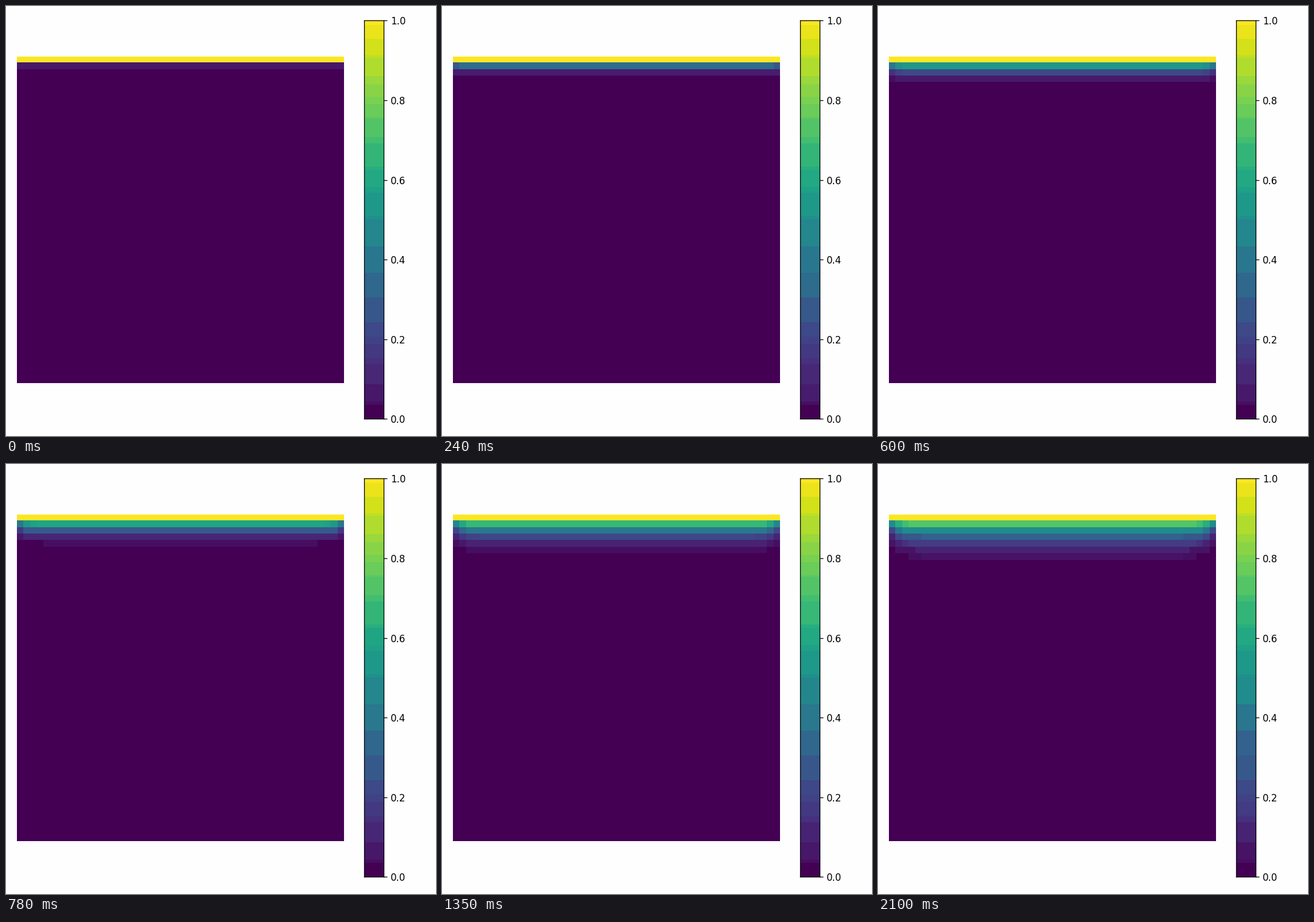
Animation, 748 px wide and 748 px high, one loop 2160 ms. Source, as a matplotlib script:

```python
import numpy as np
import matplotlib.pyplot as plt
from matplotlib.animation import FuncAnimation

SIZE, DPI = 748, 120
FRAMES, INTERVAL = 72, 30
CELLS = 50
RATE = 0.0625                 # diffusion number per time step
FRONT_STEP = 0.5272           # advance of the heat front between redraws

# Plate and colour scale, in pixels from the top left.
MIDDLE = 371.9
PLATE_LEFT, PLATE_SIDE = 19.0, 568.2
SCALE_LEFT, SCALE_HEIGHT = 622.7, 693.0
CELL_AREA = (PLATE_SIDE / CELLS) ** 2
LEVEL_AREA = SCALE_HEIGHT ** 2 / 20 / 256

LEVELS = np.linspace(1, 0, 256)[:, None]
viridis = plt.get_cmap("viridis")


def simulate(steps):
    """Heat spreading from a hot top row; everything outside is cold."""
    heat = np.zeros((CELLS, CELLS))
    heat[0] = 1
    for _ in range(steps):
        p = np.pad(heat, 1)
        near = p[:-2, 1:-1] + p[2:, 1:-1] + p[1:-1, :-2] + p[1:-1, 2:]
        heat = heat + RATE * (near - 4 * heat)
        heat[0] = 1
        yield heat


def reduce_colors(heat):
    """Merge viridis colours that share their leading 3, 4 and 3 bits."""
    values = np.concatenate([heat.ravel(), LEVELS.ravel()])
    area = np.repeat([CELL_AREA, LEVEL_AREA], [heat.size, LEVELS.size])
    rgb = viridis(values, bytes=True)[:, :3].astype(int)
    red, green, blue = rgb.T
    key = (red >> 5 << 7) | (green >> 4 << 3) | (blue >> 5)
    _, group = np.unique(key, return_inverse=True)
    total = np.bincount(group, area)
    palette = np.stack([np.bincount(group, area * channel) / total
                        for channel in rgb.T], axis=1)
    colors = (palette[group] + 1e-6).astype(np.uint8)
    return (colors[:heat.size].reshape(CELLS, CELLS, 3),
            colors[heat.size:].reshape(-1, 1, 3))


def add_image(colors, left, width, height):
    ax = fig.add_axes([left / SIZE, 1 - (MIDDLE + height / 2) / SIZE,
                       width / SIZE, height / SIZE])
    image = ax.imshow(colors, interpolation="nearest", aspect="auto",
                      extent=(0, 1, 0, 1))
    return ax, image


# The front moves with the square root of time, so redraws grow rarer.
fronts = 1 + FRONT_STEP * np.arange(FRAMES)
redraws = np.floor(fronts ** 2).astype(int) - 1
redraws = redraws[redraws < FRAMES]
states = list(simulate(FRAMES))
pictures = [reduce_colors(states[step]) for step in redraws]

plt.rcParams["font.family"] = "DejaVu Sans"
fig = plt.figure(figsize=(SIZE / DPI, SIZE / DPI), dpi=DPI, facecolor="#fefefe")

plate_ax, plate = add_image(pictures[0][0], PLATE_LEFT, PLATE_SIDE, PLATE_SIDE)
plate_ax.axis("off")

scale_ax, scale = add_image(pictures[0][1], SCALE_LEFT, SCALE_HEIGHT / 20,
                            SCALE_HEIGHT)
scale_ax.set_xticks([])
scale_ax.yaxis.tick_right()
ticks = np.arange(6) / 5
scale_ax.set_yticks(ticks, [f"{t:.1f}" for t in ticks])
scale_ax.tick_params(labelsize=10)


def update(frame):
    shown = np.searchsorted(redraws, frame, side="right") - 1
    plate_colors, scale_colors = pictures[shown]
    plate.set_data(plate_colors)
    scale.set_data(scale_colors)
    return plate, scale


anim = FuncAnimation(fig, update, frames=FRAMES, interval=INTERVAL,
                     repeat=True, repeat_delay=0, blit=False)
plt.show()
```
